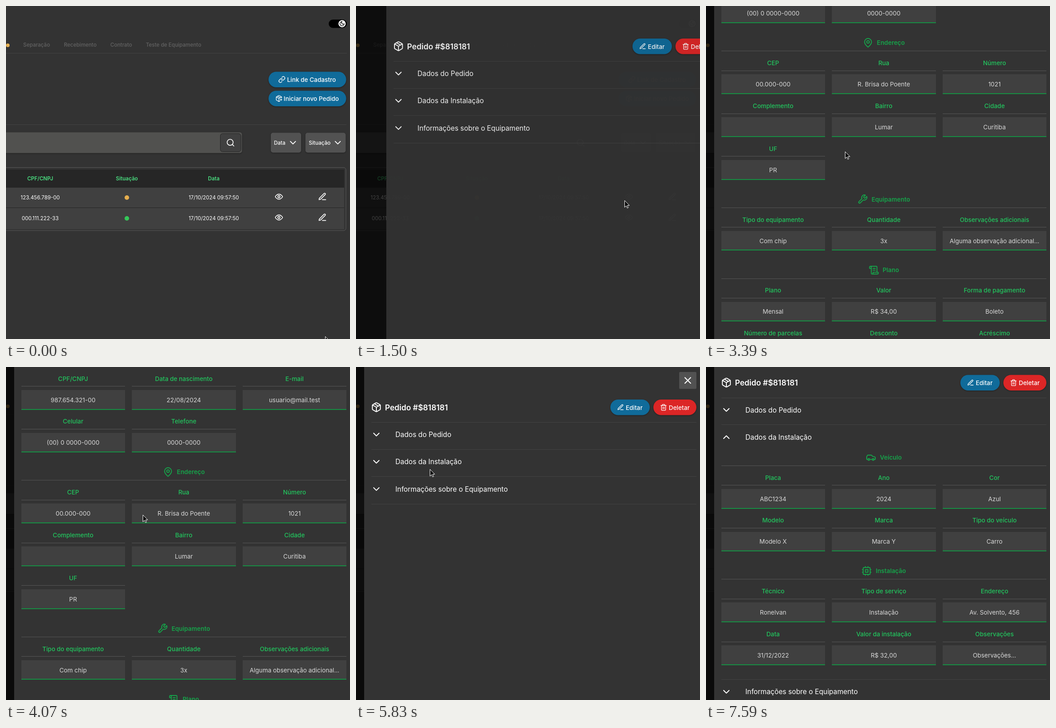
Recreate the animation shown at these times as an HTML page. Size 760x737 px, loop 8070 ms.

```html
<!DOCTYPE html>
<html lang="pt-BR">
<head>
<meta charset="utf-8">
<title>Pedidos</title>
<style>
html, body { margin: 0; width: 100%; height: 100%; overflow: hidden; background: #333; }
svg { display: block; }
text { font-family: Inter, sans-serif; white-space: pre; }
rect[rx="0"] { shape-rendering: crispEdges; }
.raised { filter: drop-shadow(0 1.5px 1.5px #0006); }
</style>
</head>
<body>
<svg id="stage" width="760" height="737" viewBox="0 0 760 737"></svg>
<script>
const LOOP = 8070, TICK = 10;
const ring = (x, y, r) => `M${x - r} ${y}a${r} ${r} 0 1 0 ${2 * r} 0a${r} ${r} 0 1 0 ${-2 * r} 0`;

const icons = {
  chevron: 'm6 9 6 6 6-6',
  close: 'M18 6 6 18M6 6l12 12',
  search: ring(11, 11, 8) + 'M21 21l-4.3-4.3',
  moon: 'M12 3a6 6 0 0 0 9 9 9 9 0 1 1-9-9Z',
  link: 'M10 13a5 5 0 0 0 7.54.54l3-3a5 5 0 0 0-7.07-7.07l-1.72 1.71M14 11a5 5 0 0 0-7.54-.54l-3 3a5 5 0 0 0 7.07 7.07l1.71-1.71',
  boxPlus: 'M16 16h6M19 13v6M21 10V8a2 2 0 0 0-1-1.73l-7-4a2 2 0 0 0-2 0l-7 4A2 2 0 0 0 3 8v8a2 2 0 0 0 1 1.73l7 4a2 2 0 0 0 2 0l2-1.14M7.5 4.27l9 5.15M3.3 7l8.7 5 8.7-5M12 22V12',
  box: 'M7.5 4.27l9 5.15M21 8a2 2 0 0 0-1-1.73l-7-4a2 2 0 0 0-2 0l-7 4A2 2 0 0 0 3 8v8a2 2 0 0 0 1 1.73l7 4a2 2 0 0 0 2 0l7-4A2 2 0 0 0 21 16ZM3.3 7l8.7 5 8.7-5M12 22V12',
  eye: 'M2 12s3-7 10-7 10 7 10 7-3 7-10 7-10-7-10-7Z' + ring(12, 12, 3),
  pencil: 'M12 20h9M16.5 3.5a2.12 2.12 0 0 1 3 3L7 19l-4 1 1-4Z',
  trash: 'M3 6h18M19 6v14a2 2 0 0 1-2 2H7a2 2 0 0 1-2-2V6M8 6V4a2 2 0 0 1 2-2h4a2 2 0 0 1 2 2v2M10 11v6M14 11v6',
  user: 'M19 21v-2a4 4 0 0 0-4-4H9a4 4 0 0 0-4 4v2' + ring(12, 7, 4),
  pin: 'M20 10c0 6-8 12-8 12s-8-6-8-12a8 8 0 0 1 16 0Z' + ring(12, 10, 3),
  wrench: 'M14.7 6.3a1 1 0 0 0 0 1.4l1.6 1.6a1 1 0 0 0 1.4 0l3.77-3.77a6 6 0 0 1-7.94 7.94l-6.91 6.91a2.12 2.12 0 0 1-3-3l6.91-6.91a6 6 0 0 1 7.94-7.94l-3.76 3.76z',
  scroll: 'M8 21h12a2 2 0 0 0 2-2v-2H10v2a2 2 0 1 1-4 0V5a2 2 0 1 0-4 0v3h4M19 17V5a2 2 0 0 0-2-2H4M15 8h-5M15 12h-5',
  car: 'M19 17h2c.6 0 1-.4 1-1v-3c0-.9-.7-1.7-1.5-1.9C18.7 10.6 16 10 16 10s-1.3-1.4-2.2-2.3c-.5-.4-1.1-.7-1.8-.7H5c-.6 0-1.1.4-1.4.9l-1.4 2.9A3.7 3.7 0 0 0 2 12v4c0 .6.4 1 1 1h2M9 17h6' + ring(7, 17, 2) + ring(17, 17, 2),
  cpu: 'M6 4h12a2 2 0 0 1 2 2v12a2 2 0 0 1-2 2H6a2 2 0 0 1-2-2V6a2 2 0 0 1 2-2ZM9 9h6v6H9ZM15 2v2M15 20v2M2 15h2M2 9h2M20 15h2M20 9h2M9 2v2M9 20v2'
};

// Text is placed by the middle of its capitals.
const text = (s, x, y, { size = 13.4, weight = 400, fill = '#fff', anchor = 'middle' } = {}) =>
  `<text x="${x}" y="${y}" dy=".364em" font-size="${size}" font-weight="${weight}" fill="${fill}" text-anchor="${anchor}">${s}</text>`;
const icon = (name, x, y, scale, color = '#fff', width = 2) =>
  `<path d="${icons[name]}" transform="translate(${x} ${y}) scale(${scale}) translate(-12 -12)" fill="none" stroke="${color}" stroke-width="${width}" stroke-linecap="round" stroke-linejoin="round"/>`;
const rect = (x, y, w, h, fill, r = 0, extra = '') =>
  `<rect x="${x}" y="${y}" width="${w}" height="${h}" rx="${r}" fill="${fill}" ${extra}/>`;
const line = (x, y, w, color = '#424242') => rect(x, y - .5, w, 1, color);
const dot = (x, y, r, fill) => `<circle cx="${x}" cy="${y}" r="${r}" fill="${fill}"/>`;
const button = (x, y, w, fill, name, iconX, label, textX) =>
  rect(x, y, w, 34.5, fill, 17.2, 'class="raised"') + icon(name, iconX, y + 17.2, .66) +
  text(label, textX, y + 17.7, { weight: 500, anchor: 'start' });
const BLUE = '#106b9a';

function page() {
  const nav = { size: 11.5, weight: 500, fill: '#636363', anchor: 'start' };
  const head = { size: 11.5, weight: 600, fill: '#4ade80' };
  const cell = { size: 11.5 };
  const pick = { size: 11.5, weight: 500, anchor: 'start' };
  const row = (y, id, color) => text(id, 75.5, y, cell) + dot(267, y, 5, color) +
    text('17/10/2024 09:57:50', 459, y, cell) + icon('eye', 603, y - 2, .8) + icon('pencil', 699, y - 2, .83);
  return rect(0, 0, 760, 737, '#333') +
    rect(713, 30, 40, 18.5, '#000', 9.2) + dot(742.5, 39.2, 8, '#fff') + icon('moon', 742.5, 39.2, .52, '#000', 2.6) +
    dot(4, 87, 4, '#e5b052') +
    text('Separação', 38, 86, nav) + text('Recebimento', 128, 86, nav) +
    text('Contrato', 230.5, 86, nav) + text('Teste de Equipamento', 309, 86, nav) +
    line(0, 104.5, 753) +
    button(580, 145.5, 171.5, BLUE, 'link', 609.5, 'Link de Cadastro', 621) +
    button(580, 187.5, 171.5, BLUE, 'boxPlus', 603, 'Iniciar novo Pedido', 613.5) +
    line(0, 262.5, 752) +
    rect(-20, 279.5, 541.5, 46, '#51514f', 5, 'class="raised"') +
    rect(473.5, 282.5, 45.5, 40, '#404040', 5, 'stroke="#242424"') + icon('search', 496, 302.5, .83) +
    rect(585, 280.5, 67, 44, '#525252', 5, 'class="raised"') + text('Data', 592, 303, pick) + icon('chevron', 634, 302.5, .95) +
    rect(661.5, 280.5, 89, 44, '#525252', 5, 'class="raised"') + text('Situação', 669, 303, pick) + icon('chevron', 733, 302.5, .95) +
    rect(-20, 357.5, 771, 139.5, 'none', 5, 'stroke="#5a5a5a"') +
    rect(0, 361.5, 747, 40, '#262626') + rect(0, 401.5, 747, 92, '#404040') + line(0, 446.5, 747, '#262626') +
    text('CPF/CNPJ', 75.5, 381.5, head) + text('Situação', 267, 381.5, head) + text('Data', 459, 381.5, head) +
    row(424, '123.456.789-00', '#e5ae4e') + row(470, '000.111.222-33', '#35c759');
}

const panels = [
  ['Dados do Pedido', [
    ['Cliente', 'user', 365, ['CPF/CNPJ|987.654.321-00', 'Data de nascimento|22/08/2024', 'E-mail|usuario@mail.test',
      'Celular|(00) 0 0000-0000', 'Telefone|0000-0000']],
    ['Endereço', 'pin', 358, ['CEP|00.000-000', 'Rua|R. Brisa do Poente', 'Número|1021',
      'Complemento|', 'Bairro|Lumar', 'Cidade|Curitiba', 'UF|PR']],
    ['Equipamento', 'wrench', 346, ['Tipo do equipamento|Com chip', 'Quantidade|3x',
      'Observações adicionais|Alguma observação adicional...']],
    ['Plano', 'scroll', 371, ['Plano|Mensal', 'Valor|R$ 34,00', 'Forma de pagamento|Boleto',
      'Número de parcelas|', 'Desconto|', 'Acréscimo|']]
  ]],
  ['Dados da Instalação', [
    ['Veículo', 'car', 364.5, ['Placa|ABC1234', 'Ano|2024', 'Cor|Azul',
      'Modelo|Modelo X', 'Marca|Marca Y', 'Tipo do veículo|Carro']],
    ['Instalação', 'cpu', 355, ['Técnico|Ronelvan', 'Tipo de serviço|Instalação', 'Endereço|Av. Solvento, 456',
      'Data|31/12/2022', 'Valor da instalação|R$ 32,00', 'Observações|Observações...']]
  ]],
  ['Informações sobre o Equipamento', []]
].map(([title, groups]) => ({ title, ...form(groups) }));

function field(spec, i, top) {
  const [label, value] = spec.split('|');
  const x = 33.5 + i % 3 * 244.6, y = top + Math.floor(i / 3) * 94.7, mid = x + 114.7;
  return text(label, mid, y, { weight: 500, fill: '#22c55e' }) + line(x, y + 17, 229.4, '#575757') +
    rect(x, y + 25, 229.4, 43.7, '#404040') + rect(x, y + 66.7, 229.4, 2, '#168f43') +
    text(value, mid, y + 47, { fill: '#d9d9d9' });
}

function form(groups) {
  let y = 44.5, html = '';
  for (const [name, pic, x, fields] of groups) {
    html += icon(pic, x, y, .957, '#16a34a') + text(name, 408.3, y, { weight: 600, fill: '#16a34a' }) +
      line(33.5, y + 18.5, 718.5, '#545454') + fields.map((f, i) => field(f, i, y + 45)).join('');
    y += 62.2 + Math.ceil(fields.length / 3) * 94.7;
  }
  return { html, height: y - 44.5 };
}

const drawer = () => rect(18, 0, 742, 737, '#333') + '<g id="scroller">' +
  rect(714, 11, 38, 37.5, '#525252', 2) + icon('close', 733, 29.7, 1.05) +
  icon('box', 45, 89, .98) + text('Pedido #$818181', 64, 89.5, { size: 17.2, weight: 600, anchor: 'start' }) +
  button(562, 72, 87, BLUE, 'pencil', 584.5, 'Editar', 596) +
  button(657, 72, 95, '#dc2626', 'trash', 679.5, 'Deletar', 691) +
  line(34, 122.5, 718) +
  panels.map(p => `<g class="panel"><g class="trigger"><g class="arrow">${icon('chevron', 0, 0, 1)}</g>` +
    text(p.title, 87, 0, { size: 15.3, anchor: 'start' }) +
    `</g><svg class="body" y="20" width="760" height="0"><g transform="translate(0 -20)">${p.html}</g></svg>` +
    `<g class="rule">${line(34, 32.9, 718)}</g></g>`).join('') + '</g>';

const outline = 'fill="#0a0a0a" stroke="#fff" stroke-linejoin="round"';
stage.innerHTML = page() + rect(0, 0, 760, 737, '#000', 0, 'id="shade"') + `<g id="drawer">${drawer()}</g>
  <g id="cursor">
    <path id="pointer" ${outline} d="M.5.5V15.5L4 12.2 6.3 17.3 8.6 16.3 6.3 11.3H11Z"/>
    <path id="hand" ${outline} d="M-1.2 1.3a1.3 1.3 0 0 1 2.6 0V7.2c1-.8 2.3-.5 2.6.5 1-.6 2.2-.2 2.5.7 1.2-.4 2.4.2 2.4 1.6V14l-1.6 3.5v2H-.6l-.2-2-3.8-5.1c-.9-1.3.6-2.4 1.8-1.4l1.6 1.4Z"/>
  </g>`;

const $ = id => document.getElementById(id);
const parts = [...document.querySelectorAll('.panel')].map(el =>
  ['trigger', 'arrow', 'body', 'rule'].reduce((o, c) => ({ ...o, [c]: el.querySelector('.' + c) }), { el }));
const move = (el, x, y, more = '') => el.setAttribute('transform', `translate(${x} ${y}) ${more}`);

const smooth = p => p * p * (3 - 2 * p);
const linear = p => p;
const settle = p => 1 - (1 - smooth(p)) ** 1.6;

// Keys are [time, ...values]; values are held before the first and after the last.
function at(t, keys, ease = smooth) {
  const i = keys.findIndex(k => k[0] > t);
  if (i < 1) return keys.at(i).slice(1);
  const a = keys[i - 1], b = keys[i], p = ease((t - a[0]) / (b[0] - a[0]));
  return a.slice(1).map((v, j) => v + (b[j + 1] - v) * p);
}

const cursorKeys = [
  [0, 705, 731], [810, 597, 424], [1400, 597, 424], [1500, 593, 430], [2380, 177, 151], [2780, 177, 151],
  [3060, 307, 322], [3520, 307, 322], [3730, 302, 327], [4620, 302, 327], [5100, 172, 152], [5430, 172, 152],
  [5800, 163, 226], [5850, 163, 226], [5950, 168, 212], [6800, 168, 212], [7380, 609, 652], [7510, 666, 706]
];
const scrollKeys = [
  [3060, 0], [3390, 364.2], [3520, 364.2], [3730, 430], [3900, 430], [4070, 213.2], [4480, 0], [6540, 0], [6800, 54.5]
];
const openKeys = [
  [[2620, 0], [2880, 1], [5160, 1], [5420, 0]],
  [[6000, 0], [6320, 1]],
  [[0, 0]]
];

function draw(t) {
  const [shown] = at(t, [[1100, 0], [1650, 1]], settle);
  const [scroll] = at(t, scrollKeys, linear);
  const [x, y] = at(t, cursorKeys);

  $('shade').setAttribute('opacity', .8 * shown);
  $('drawer').setAttribute('opacity', shown);
  move($('drawer'), 742 * (1 - shown), 0);
  move($('scroller'), 0, -scroll);

  let top = 149.5, hot = !shown && Math.hypot(x - 603, y - 422) < 13;
  parts.forEach((p, i) => {
    const [open] = at(t, openKeys[i]);
    const height = panels[i].height * Math.min(1, open * 1.3);
    const over = shown === 1 && x > 34 && x < 752 && Math.abs(y - top + scroll) < 12;
    hot ||= over;
    move(p.el, 0, top);
    p.trigger.setAttribute('opacity', over ? .65 : 1);
    move(p.arrow, 45, 0, `rotate(${180 * open})`);
    p.body.setAttribute('height', height);
    move(p.rule, 0, height);
    top += 60.3 + height;
  });

  move($('cursor'), x, y);
  $('cursor').setAttribute('visibility', t < 7590 ? 'visible' : 'hidden');
  $('hand').setAttribute('opacity', +hot);
  $('pointer').setAttribute('opacity', +!hot);
}

const start = performance.now();
function tick() {
  const t = (performance.now() - start) % LOOP;
  draw(Math.floor(t / TICK) * TICK);
  requestAnimationFrame(tick);
}
tick();
</script>
</body>
</html>
```
